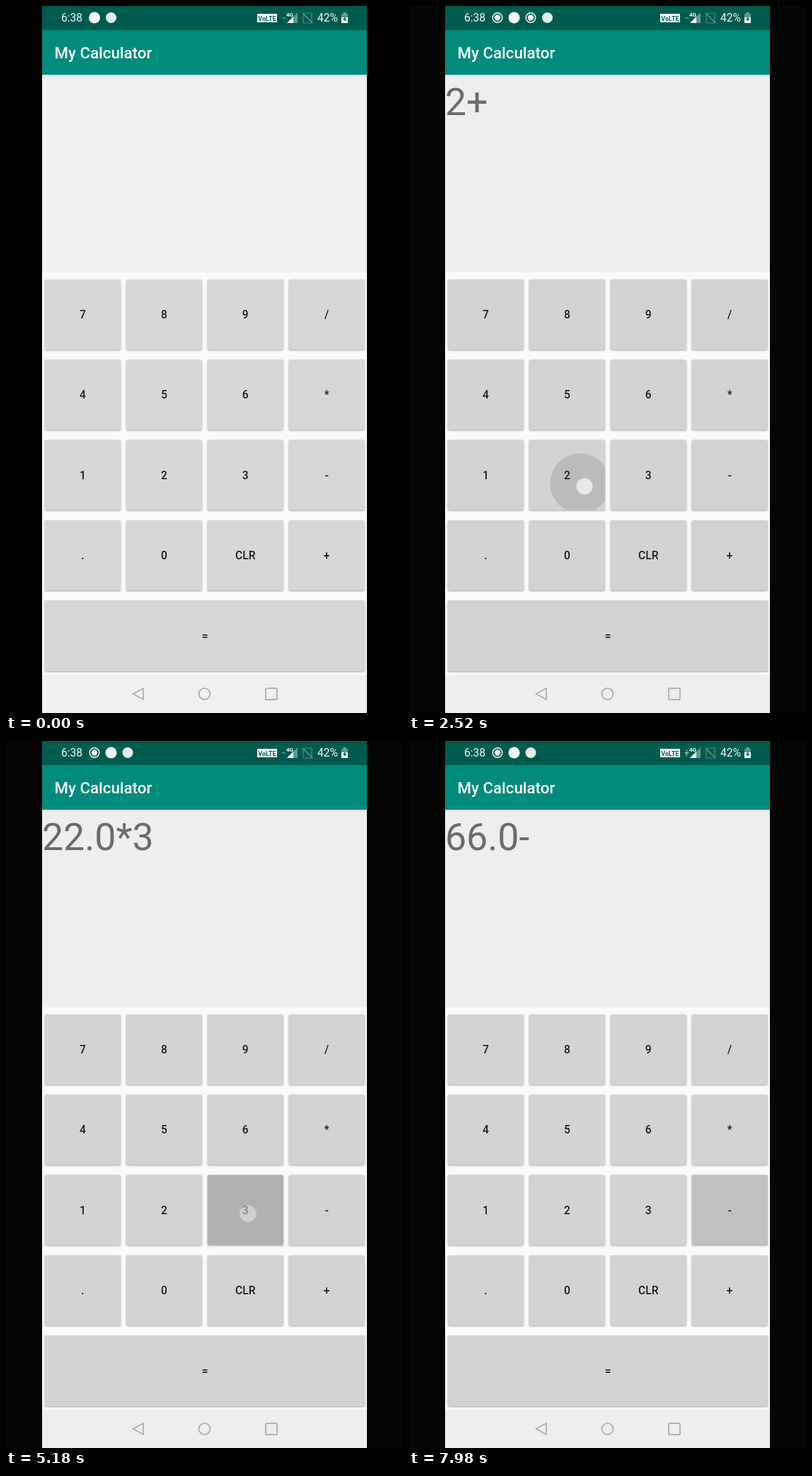
Write an HTML page with a canvas that moves like this. It is 561x998 px and loops after 8 s.

```html
<!DOCTYPE html>
<html lang="en">
<head>
<meta charset="utf-8">
<title>My Calculator</title>
<style>
  html, body { margin: 0; width: 100%; height: 100%; overflow: hidden; background: #000; }
  canvas { display: block; }
</style>
</head>
<body>
<canvas id="stage" width="561" height="998"></canvas>
<script>
const ctx = document.getElementById('stage').getContext('2d');
const LOOP = 8000, LEFT = 51, WIDTH = 459;
const INK = '#17201d';

const keys = {};
['789/', '456*', '123-', '.0C+'].forEach((row, r) => [...row].forEach((key, c) => {
  keys[key] = { label: key === 'C' ? 'CLR' : key, x: 55 + c * 114.9, y: 386 + r * 113.3, w: 107, h: 99 };
}));
keys['='] = { label: '=', x: 55, y: 839, w: 452, h: 100 };

// Each tap: key, press and release time, touch point, display after release.
const taps = [
  ['2', 1175, 1320, 255, 667, '2'],
  ['+', 1735, 1960, 462, 780, '2+'],
  ['2', 2470, 2575, 248, 678, '2+2'],
  ['0', 2790, 2930, 243, 786, '2+20'],
  ['=', 3255, 3375, 340, 913, '22.0'],
  ['*', 4320, 4460, 462, 560, '22.0*'],
  ['3', 5000, 5130, 342, 667, '22.0*3'],
  ['=', 5780, 5845, 336, 893, '66.0'],
  ['-', 7670, 7800, 458, 668, '66.0-'],
].map(([key, down, up, x, y, text]) => ({ key: keys[key], down, up, x, y, text }));

const progress = (t, from, to) => Math.min(1, Math.max(0, (t - from) / (to - from)));
const mix = (a, b, p) => a + (b - a) * p;
const ease = p => p * p / (p * p + 0.26 * (1 - p) * (1 - p));
const gray = v => `rgb(${v},${v},${v})`;

function rect(x, y, w, h, color) {
  ctx.fillStyle = color;
  ctx.fillRect(x, y, w, h);
}

function circle(x, y, r, color, stroke) {
  ctx.beginPath();
  ctx.arc(x, y, r, 0, 2 * Math.PI);
  paint(color, stroke);
}

function polygon(points, color, stroke) {
  ctx.beginPath();
  points.forEach(([x, y]) => ctx.lineTo(x, y));
  ctx.closePath();
  paint(color, stroke);
}

function paint(color, stroke) {
  if (stroke) {
    ctx.strokeStyle = color;
    ctx.lineWidth = stroke;
    ctx.stroke();
  } else {
    ctx.fillStyle = color;
    ctx.fill();
  }
}

function text(string, x, y, size, color, weight = 400, align = 'left') {
  ctx.font = `${weight} ${size}px Roboto, sans-serif`;
  ctx.textAlign = align;
  ctx.fillStyle = color;
  ctx.fillText(string, x, y);
}

function withAlpha(alpha, draw) {
  ctx.save();
  ctx.globalAlpha = alpha;
  draw();
  ctx.restore();
}

function recordIcon(x, alpha) {
  withAlpha(alpha, () => {
    circle(x, 16.5, 6.8, '#fff', 1.4);
    circle(x, 16.5, 4.2, '#fff');
  });
}

function statusBar(t) {
  rect(LEFT, 0, WIDTH, 34, '#005b4f');
  text('6:38', 78, 22, 15.6, '#f2f6f5');

  const first = ease(progress(t, 70, 420));
  const second = ease(progress(t, 490, 840));
  const removed = ease(progress(t, 3980, 4200));
  recordIcon(125, first);
  circle(mix(125, 148.5, first), 16.5, 8, '#fff');
  recordIcon(172, second * (1 - removed));
  circle(148.5 + 23.5 * (first + second - removed), 16.5, 7.5, '#e6efed');

  rect(355, 11, 28, 12, '#fff');
  text('VoLTE', 369, 20.5, 9, '#005b4f', 700, 'center');

  const busy = (t > 910 && t < 1400) || t > 7210;
  rect(390, 16.2, 5, 1.3, busy ? '#e8f0ee' : '#6f9f97');
  if (busy) {
    rect(391.8, 13.2, 1.5, 1.5, '#e8f0ee');
    rect(391.8, 19, 1.5, 1.5, '#e8f0ee');
  }
  polygon([[397, 24], [412, 24], [412, 9]], '#5d968d');
  polygon([[397, 24], [406, 24], [406, 15]], '#fff');
  text('4G', 396, 15, 8, '#fff', 700);

  polygon([[423, 10], [432, 10], [432, 24], [420, 24], [420, 13]], '#4c867d', 1.2);
  polygon([[419, 10], [433, 24]], '#6a9d95', 1.2);

  text('42%', 440, 22, 15.6, '#f2f6f5');
  rect(476.5, 9, 4, 2, '#7faaa3');
  rect(474, 11, 9, 5, '#5d968d');
  rect(474, 16, 9, 8, '#fff');
  rect(478, 16, 1.5, 5, '#005b4f');
  rect(476.2, 18, 5, 1.4, '#005b4f');
}

function navigation(shade) {
  rect(LEFT, 944, WIDTH, 54, gray(shade));
  polygon([[179.5, 971], [194, 963], [194, 979]], '#aaa', 1.6);
  circle(280.5, 971, 8, '#aaa', 1.7);
  ctx.beginPath();
  ctx.roundRect(367, 963.2, 16, 16, 2);
  paint('#aaa', 1.7);
}

function ripple({ key, down, up, x, y }, t) {
  const leave = Math.max(down + 225, up);
  if (t < down || t > leave + 180) return;
  const grow = ease(progress(t, down, down + 225));
  const alpha = 0.17 * progress(t, down, down + 75) * (1 - progress(t, leave, leave + 180));
  const radius = mix(key.w * 0.3, Math.hypot(key.w, key.h) / 2 + 1, grow);
  ctx.save();
  ctx.beginPath();
  ctx.roundRect(key.x, key.y, key.w, key.h, 2);
  ctx.clip();
  circle(mix(x, key.x + key.w / 2, grow), mix(y, key.y + key.h / 2, grow), radius, `rgba(0,0,0,${alpha})`);
  ctx.restore();
}

function touchDot({ down, up, x, y }, t) {
  if (t < down || t > up + 110) return;
  withAlpha(0.9 * (1 - progress(t, up, up + 110)), () => {
    circle(x, y, 12, '#f0f0f0');
    circle(x, y, 12, '#bcbcbc', 1);
  });
}

function button({ x, y, w, h }, shade) {
  ctx.save();
  ctx.shadowColor = 'rgba(0,0,0,.35)';
  ctx.shadowBlur = 2.5;
  ctx.shadowOffsetY = 1;
  ctx.beginPath();
  ctx.roundRect(x, y, w, h, 2);
  paint(gray(shade));
  ctx.restore();
}

function draw(t) {
  const dim = progress(t, 70, 840);
  const pane = mix(240, 238, dim);
  const allKeys = Object.values(keys);

  rect(0, 0, 561, 998, gray(mix(0, 5, dim)));
  rect(LEFT, 0, WIDTH, 998, '#fafafa');
  rect(LEFT, 97, WIDTH, 279, gray(pane));
  rect(LEFT, 97, WIDTH, 1.5, '#dadedd');
  rect(LEFT, 34, WIDTH, 63, '#008b7a');
  text('My Calculator', 68.5, 74, 22.3, '#fff', 500);
  statusBar(t);
  navigation(pane);

  const shown = taps.filter(tap => t >= tap.up).pop();
  if (shown) text(shown.text, LEFT, 154, 53.6, '#6b6d6d');

  allKeys.forEach(key => button(key, mix(215, 211, dim)));
  taps.forEach(tap => ripple(tap, t));
  allKeys.forEach(({ label, x, y, w, h }) =>
    text(label, x + w / 2, y + h / 2 + 5.5, 15.6, INK, 500, 'center'));
  taps.forEach(tap => touchDot(tap, t));
}

function tick() {
  draw(performance.now() % LOOP);
  requestAnimationFrame(tick);
}
tick();
</script>
</body>
</html>
```
